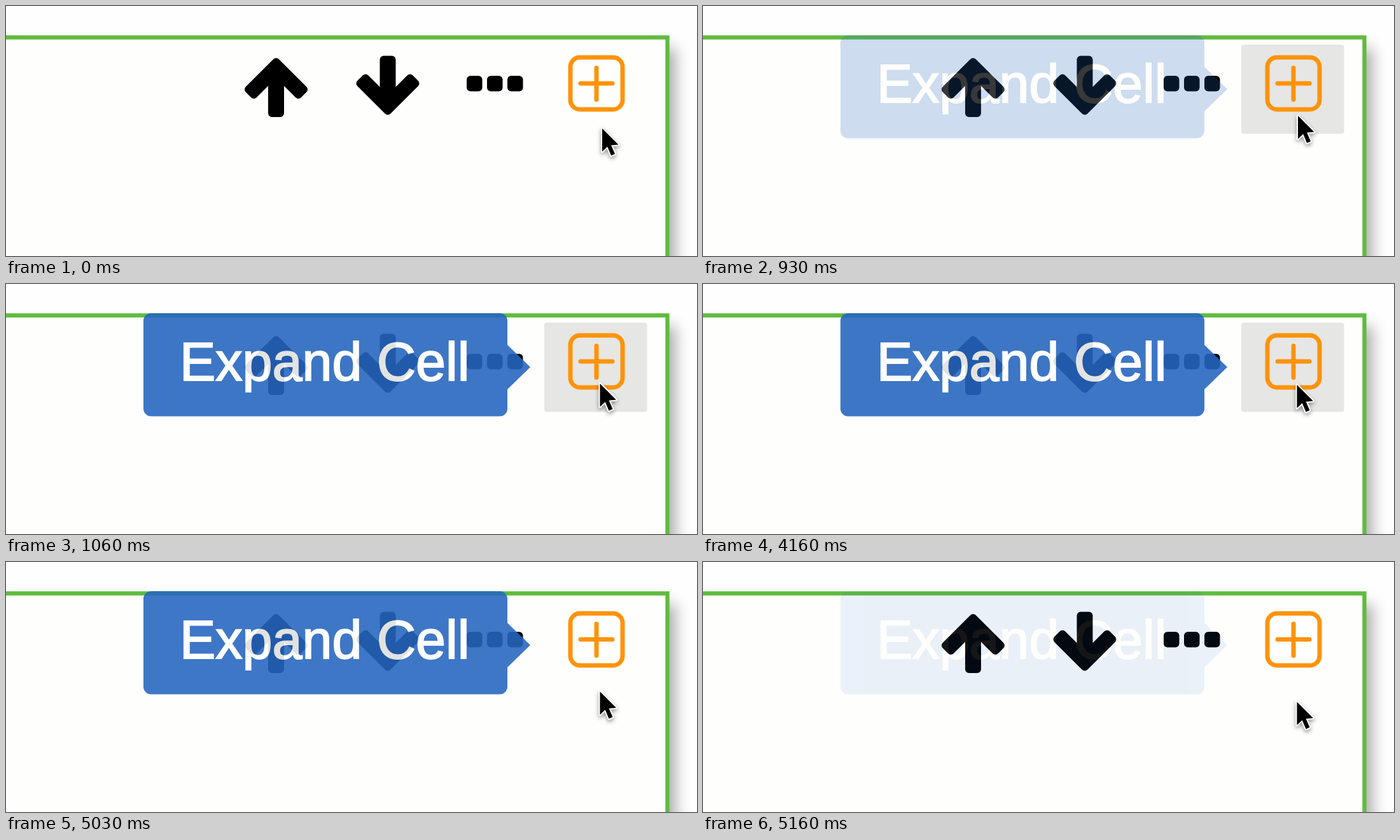
An HTML page that plays this animation: 1086x394 px, repeating every 5200 ms.

```html
<!DOCTYPE html>
<html lang="en">
<head>
<meta charset="utf-8">
<title>Expand Cell tooltip</title>
<style>
  html, body { margin: 0; width: 100%; height: 100%; overflow: hidden; background: #fefefe; }
  #stage { position: relative; width: 1086px; height: 394px; overflow: hidden; }
  #card {
    position: absolute;
    left: -40px; top: 47px; width: 1082px; height: 500px;
    background: #fefefd;
    box-shadow: 10px 20px 22px rgba(0, 0, 0, .33);
  }
  svg { position: absolute; left: 0; top: 0; }
  #tip text {
    font: 84.5px "Liberation Sans", Arial, sans-serif;
    fill: #fff; stroke: #fff; stroke-width: 2px;
  }
  #cursor { filter: drop-shadow(0 3px 3px rgba(0, 0, 0, .4)); }
</style>
</head>
<body>
<div id="stage">
  <div id="card"></div>
  <svg width="1086" height="394" viewBox="0 0 1086 394">
    <defs>
      <path id="arrow" stroke="#000" stroke-width="12" stroke-linejoin="round"
        d="M424.5 88 468 131.5 459.5 140 431 111.5V169H418V111.5L389.5 140 381 131.5Z"/>
      <rect id="dot" x="724" y="110" width="24.5" height="24.5" rx="6"/>
    </defs>
    <path d="M-10 49.5H1039.5V410" fill="none" stroke="#60bc3f" stroke-width="6.4"/>
    <rect id="hover" x="846" y="61" width="161.5" height="140.5" rx="4" fill="#e6e6e5"/>
    <use href="#arrow"/>
    <use href="#arrow" transform="matrix(1 0 0 -1 175.5 253.5)"/>
    <use href="#dot"/>
    <use href="#dot" x="32"/>
    <use href="#dot" x="64"/>
    <g fill="none" stroke="#ff930a" stroke-width="7">
      <rect x="887" y="81" width="82" height="82" rx="15"/>
      <path d="M903 122H953M928 97.5V147.5" stroke-linecap="round"/>
    </g>
    <g id="tip">
      <path fill="#2666bf" d="M228 46H776a12 12 0 0 1 12 12V96L824 131 788 166V196.5a12 12 0 0 1-12 12H228a12 12 0 0 1-12-12V58a12 12 0 0 1 12-12Z"/>
      <text x="273" y="151.5">Expand Cell</text>
    </g>
    <g id="cursor">
      <path transform="scale(.91)" d="M0 0V40L9 31.5 15.500 47 22 44 15.500 29 28 28Z"
        stroke="#fff" stroke-width="4.5" stroke-linejoin="round" paint-order="stroke"/>
    </g>
  </svg>
</div>
<script>
  const LOOP = 5200, FULL = 0.89;
  const [hover, tip, cursor] = ['hover', 'tip', 'cursor'].map(id => document.getElementById(id));

  const progress = (ms, from, to) => Math.max(0, Math.min(1, (ms - from) / (to - from)));

  // Pointer moves: up onto the button, two small nudges, then steadily away.
  const moves = [
    { from: 835, to: 1060, dx: -3.5, dy: -36, power: 1.4 },
    { from: 4140, to: 4160, dx: 0, dy: 2, power: 1 },
    { from: 4370, to: 4400, dx: 0, dy: 2.5, power: 1 },
    { from: 4700, to: 5160, dx: 0, dy: 59, power: 1 }
  ];

  // The picture steps at 30 frames a second, on a clock of 10 ms ticks.
  function snap(time) {
    const ticks = Math.floor(time / 10) + 1;
    return (Math.ceil(ticks * 3 / 10) - 1) * 100 / 3;
  }

  function draw(time) {
    const ms = snap(time);
    let x = 937, y = 193;
    for (const { from, to, dx, dy, power } of moves) {
      const eased = 1 - (1 - progress(ms, from, to)) ** power;
      x += dx * eased;
      y += dy * eased;
    }
    cursor.setAttribute('transform', `translate(${x} ${y})`);
    tip.setAttribute('opacity', FULL * (progress(ms, 896, 1046) - progress(ms, 5033, 5181)));
    hover.setAttribute('visibility', ms > 850 && ms < 5020 ? 'visible' : 'hidden');
  }

  const start = performance.now();
  function tick() {
    draw((performance.now() - start) % LOOP);
    requestAnimationFrame(tick);
  }
  tick();
</script>
</body>
</html>
```
